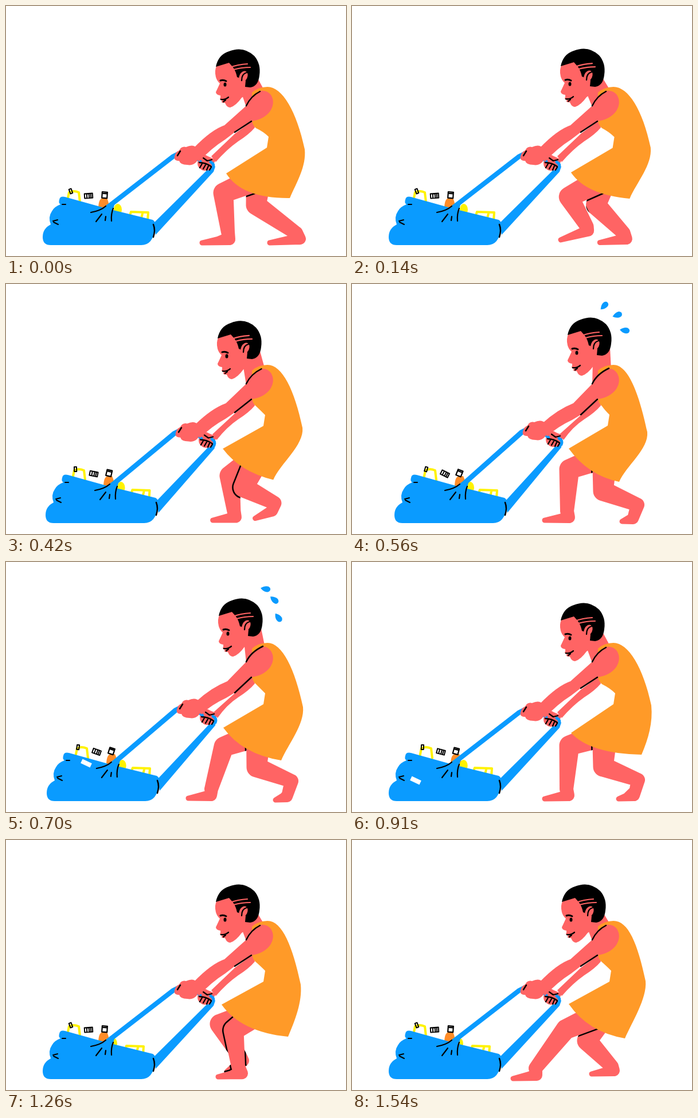
Animation of 593 by 436 pixels, one loop 1.61 s. Source, as an HTML page with a canvas:

```html
<!DOCTYPE html>
<html lang="en">
<head>
<meta charset="utf-8">
<title>Pulling the bag</title>
<style>
html, body { margin: 0; height: 100%; overflow: hidden; background: #fff; }
canvas { display: block; }
</style>
</head>
<body>
<canvas width="593" height="436"></canvas>
<script>
const ctx = document.querySelector('canvas').getContext('2d');
const STEP = 70, COUNT = 23;
const SKIN = '#ff6464', DRESS = '#ff9a28', BLUE = '#0a9bff', YELLOW = '#fff200', INK = '#000';

// Poses are given at these steps and eased in between.
const keys = [0, 4, 8, 10, 13, 18, 22];

// knee, ankle, heel, toe
const nearLeg = [
  [379, 326, 387, 394, 390, 407, 342, 413],
  [383, 344, 425, 379, 426, 382, 382, 405],
  [438, 361, 498, 385, 490, 409, 471, 414],
  [437, 358, 498, 382, 490, 409, 470, 415],
  [438, 357, 499, 380, 492, 407, 465, 413],
  [397, 332, 405, 395, 412, 407, 370, 413],
  [373, 330, 320, 398, 322, 410, 281, 416]
];
const farLeg = [
  [436, 347, 506, 396, 513, 406, 460, 413],
  [408, 345, 425, 396, 428, 406, 389, 412],
  [379, 323, 375, 396, 379, 407, 336, 412],
  [380, 322, 358, 396, 358, 407, 318, 412],
  [379, 320, 374, 396, 378, 407, 336, 413],
  [373, 321, 411, 383, 414, 385, 385, 404],
  [410, 350, 453, 395, 457, 402, 418, 408]
];
// tip, hem control, corner, side, waist
const dressPose = [
  [384, 292, 412, 336, 495, 335, 521, 250, 458, 228],
  [379, 288, 405, 323, 470, 338, 520, 244, 456, 229],
  [378, 287, 412, 334, 466, 345, 515, 258, 449, 228],
  [379, 289, 412, 335, 480, 346, 518, 253, 452, 229],
  [382, 298, 415, 334, 505, 336, 522, 250, 459, 229],
  [376, 287, 410, 335, 492, 343, 514, 252, 452, 228],
  [378, 286, 412, 335, 476, 346, 512, 246, 452, 228]
];
// head x, head y, bag, litter, carton, arm lift
const bodyPose = [
  [0, 0, 0, 0, 0, 0],
  [-4, -3, 0, 0, 0, 0],
  [10, -17, 10, 18, 5, 1],
  [5, -12, 7, 14, 3, 1],
  [-2, -4, 0, 11, -4, 0],
  [0, 2, 0, 0, -8, 0],
  [0, 2, 0, 0, -8, 0]
];

// Cyclic Hermite curve through the poses, flat at turning points.
function sample(rows, f) {
  const n = keys.length;
  const time = i => keys[(i + n) % n] + COUNT * Math.floor(i / n);
  const i = keys.filter(k => k <= f).length - 1;
  const h = time(i + 1) - time(i), u = (f - time(i)) / h;
  return rows[0].map((_, c) => {
    const v = j => rows[(j + n) % n][c];
    const slope = j => (v(j + 1) - v(j)) * (v(j) - v(j - 1)) <= 0 ? 0
      : (v(j + 1) - v(j - 1)) / (time(j + 1) - time(j - 1));
    const s = u * u * (3 - 2 * u);
    return v(i) + (v(i + 1) - v(i)) * s
      + h * u * (1 - u) * (slope(i) * (1 - u) - slope(i + 1) * u);
  });
}

const fill = (d, color) => {
  ctx.fillStyle = color;
  ctx.fill(new Path2D(d));
};
const line = (d, color = INK, width = 2.5) => {
  ctx.strokeStyle = color;
  ctx.lineWidth = width;
  ctx.stroke(new Path2D(d));
};
const oval = (x, y, rx, ry, turn, color) => {
  ctx.fillStyle = color;
  ctx.beginPath();
  ctx.ellipse(x, y, rx, ry, turn, 0, 7);
  ctx.fill();
};
function at(x, y, degrees, draw) {
  ctx.save();
  ctx.translate(x, y);
  ctx.rotate(degrees * Math.PI / 180);
  draw();
  ctx.restore();
}

function taper(x1, y1, r1, x2, y2, r2) {
  const p = new Path2D(), a = Math.atan2(y2 - y1, x2 - x1);
  const d = Math.hypot(x2 - x1, y2 - y1) || 1;
  const b = Math.acos(Math.min(1, (r1 - r2) / d));
  p.arc(x1, y1, r1, a + b, a - b + 2 * Math.PI);
  p.arc(x2, y2, r2, a - b, a + b);
  p.closePath();
  return p;
}
function legPath([kx, ky, ax, ay, hx, hy, tx, ty]) {
  const p = new Path2D(`M${ax} ${ay}L${hx} ${hy}L${tx} ${ty}Z`);
  p.addPath(taper(441, 300, 22, kx, ky, 17.5));
  p.addPath(taper(kx, ky, 17.5, ax, ay, 12));
  p.addPath(taper(ax, ay, 12, hx, hy, 10));
  p.addPath(taper(hx, hy, 10, tx, ty, 4.5));
  return p;
}
function drawLegs(f) {
  const far = legPath(sample(farLeg, f)), near = legPath(sample(nearLeg, f));
  ctx.fillStyle = SKIN;
  ctx.fill(far);
  // The near leg gets an ink edge only where it crosses the far one.
  ctx.save();
  ctx.clip(far);
  ctx.strokeStyle = INK;
  ctx.lineWidth = 5;
  ctx.stroke(near);
  ctx.restore();
  ctx.fill(near);
}

function drawLitter(shift, carton) {
  at(shift, 0, 0, () => {
    line('M107 340L110 325Q117 321 127 325L129 342', YELLOW, 4);
    fill('M161 354Q161 337 168 335L176 335Q181 345 179 356Z', '#ff8c28');
  });
  at(113 + shift * .9, 323, -20 + shift * 2, () => line('M-2 -4H2V4H-2Z', INK, 2));
  at(144 + shift, 331, -4 + shift * 1.7, () => line('M-7 -4H7V4H-7ZM-3 -4V4M1 -4V4M4 -4V4', INK, 2));
  at(172 + shift * .85, 330, 4 + shift, () => line('M-4.5 -5.5H4.5V5H-4.5ZM-4 -3H4', INK, 2.2));
  at(carton, 0, 0, () => {
    oval(195 + shift / 3, 355, 7, 10, 0, YELLOW);
    line('M215 368L218 359L248 360L247 374M238 362L236 370', YELLOW, 4);
  });
}

function drawBag(x) {
  at(x, 0, 0, () => {
    fill('M93 338Q94 331 103 333L175 353L256 373Q261 376 260 383Q259 402 252 410Q246 417 236 417H78Q64 417 64 403Q64 388 78 381Q73 368 80 358Q84 350 95 346Q91 343 93 338Z', BLUE);
    line('M98 346L104 346M82 375L90 373M83 377L91 381', INK, 2);
    line('M257 381Q261 391 257 403');
  });
}

function drawNearRope(x, lift) {
  const hx = 4 * lift, hy = -4 * lift;
  fill(`M${158 + x} 360L${178 + x} 345L${289 + hx} ${259 + hy}L${303 + hx} ${252 + hy}L${304 + hx} ${258 + hy}L${189 + x} 347L${185 + x} 362Z`, BLUE);
  at(x, 0, 0, () => line('M148 360Q165 357 174 349M187 353Q183 362 184 375M167 363L157 376M174 367L173 374', INK, 2.2));
}

function drawFarArm(lift) {
  fill(`M400 ${222 + 6 * lift}L${358 + 4 * lift} 262L${366 + 3 * lift} 272Q385 ${250 - lift} 405 236Q424 224 434 212L430 200Z`, SKIN);
  at(4 * lift, -3 * lift, 0, () => {
    fill('M336 264Q345 256 352 262L366 268L357 285Q345 290 339 284Q331 279 336 264Z', SKIN);
    line('M334 267L339 271M357 272Q364 276 361 283', BLUE, 5);
    line('M337 273Q348 273 358 280M342 275L338 282M348 277L344 284M353 279L350 286M358 281L355 286M344 265L351 270L359 268', INK, 2.3);
  });
}

function drawNearArm(p) {
  fill(`M${443 + 4 * p} 148Q428 156 419 174L${381 + 5 * p} 208Q358 ${216 + 3 * p} ${328 + 4 * p} ${247 - 4 * p}L${336 + 4 * p} ${272 - 6 * p}Q358 ${248 + p} ${382 + 2 * p} ${233 + 4 * p}L399 ${220 + 8 * p}L428 201Q450 198 461 183Q470 168 462 155Q455 146 ${443 + 4 * p} 148Z`, SKIN);
  line(`M419 174Q427 157 ${443 + 5 * p} ${149 - 2 * p}M399 ${220 + 8 * p}L428 201`);
  at(4 * p, -5 * p, 0, () => {
    fill('M302 252Q306 244 314 246Q326 240 334 248L340 262L332 272Q326 279 316 277Q304 277 302 270Q292 270 294 262Q296 254 302 252Z', SKIN);
    line('M304 253L299 261');
  });
}

function drawHead(x, y) {
  fill(`M${410 + x} ${150 + y}L${440 + x} ${128 + y}L452 150L419 176Z`, SKIN);
  at(x, y, 0, () => {
    fill('M368 103Q363 112 366 124Q368 131 373 135Q368 146 366 150Q366 155 374 156L374 160Q371 163 377 165Q373 169 382 169Q385 177 391 177Q401 174 411 160L425 150L434 110L400 92Z', SKIN);
    fill('M366 106Q370 85 389 79Q414 69 433 87Q445 101 442 121Q440 140 426 142L417 141L418 130L403 124Q401 114 396 107L389 99Z', INK);
    oval(414, 123, 7, 10, .45, SKIN);
    line('M411 130Q411 118 420 116', INK, 2.3);
    line('M391 107Q404 102 421 101M397 111Q411 107 426 107', SKIN, 2.2);
    line('M374 130Q379 128 384 131', INK, 3);
    oval(382, 137, 2.5, 3.6, 0, INK);
    line('M375 163Q382 164 388 159M379 167L383 164', INK, 2.3);
  });
}

function drawDress([tx, ty, mx, my, cx, cy, sx, sy, wx, wy]) {
  fill(`M429 151Q440 141 456 141C482 141 ${sx - 14} ${sy - 66} ${sx} ${sy}C${sx + 3} ${sy + 30} ${cx + 12} ${cy - 28} ${cx} ${cy}Q${mx} ${my} ${tx} ${ty}L${wx - 3} ${wy + 19}L${wx} ${wy}Q${wx - 9} ${wy - 9} 436 213Q429 208 429 196Z`, DRESS);
}

function drawSweat(f) {
  if (f < 7 || f > 11) return;
  const u = (f - 8) / 2, size = f < 8 ? .7 : 1;
  // start x, start y, angle, then the change of each
  for (const [x, y, a, dx, dy, da] of [
    [440, 38, -45, 13, 9, 55], [463, 54, -18, 5, 12, 58], [476, 81, 8, -1, 16, 47]
  ]) at(x + dx * u, y + dy * u, a + da * u, () => {
    ctx.scale(size, size);
    fill('M-9 0Q-2 -6 4 -5Q9 -3 8 1Q7 5 2 5Q-4 5 -9 0Z', BLUE);
  });
}

function drawLabel(f) {
  const patch = () => fill('M-9 -4H9V4H-9Z', '#fff');
  if (f >= 3 && f <= 5) at(125, 366, -25, patch);
  if (f >= 9 && f <= 14) {
    const u = (f - 10) / 3;
    at(140 - 29 * u, 351 + 30 * u, 25, patch);
  }
}

function drawScene(f) {
  const [hx, hy, bag, litter, carton, lift] = sample(bodyPose, f);
  ctx.clearRect(0, 0, 593, 436);
  ctx.lineCap = ctx.lineJoin = 'round';
  drawLitter(litter, carton);
  fill(`M${257 + bag} 379L${357 + 4 * lift} ${280 - 4 * lift}L${365 + lift} ${280 - 4 * lift}L${362 + 3 * lift} ${289 - 4 * lift}L${261 + bag} 399Z`, BLUE);
  drawBag(bag);
  drawLabel(f);
  drawNearRope(bag * 1.4, lift);
  drawFarArm(lift);
  drawHead(hx, hy);
  drawLegs(f);
  drawDress(sample(dressPose, f));
  drawNearArm(lift);
  drawSweat(f);
}

function tick() {
  drawScene(Math.floor(performance.now() / STEP) % COUNT);
  requestAnimationFrame(tick);
}
tick();
</script>
</body>
</html>
```
